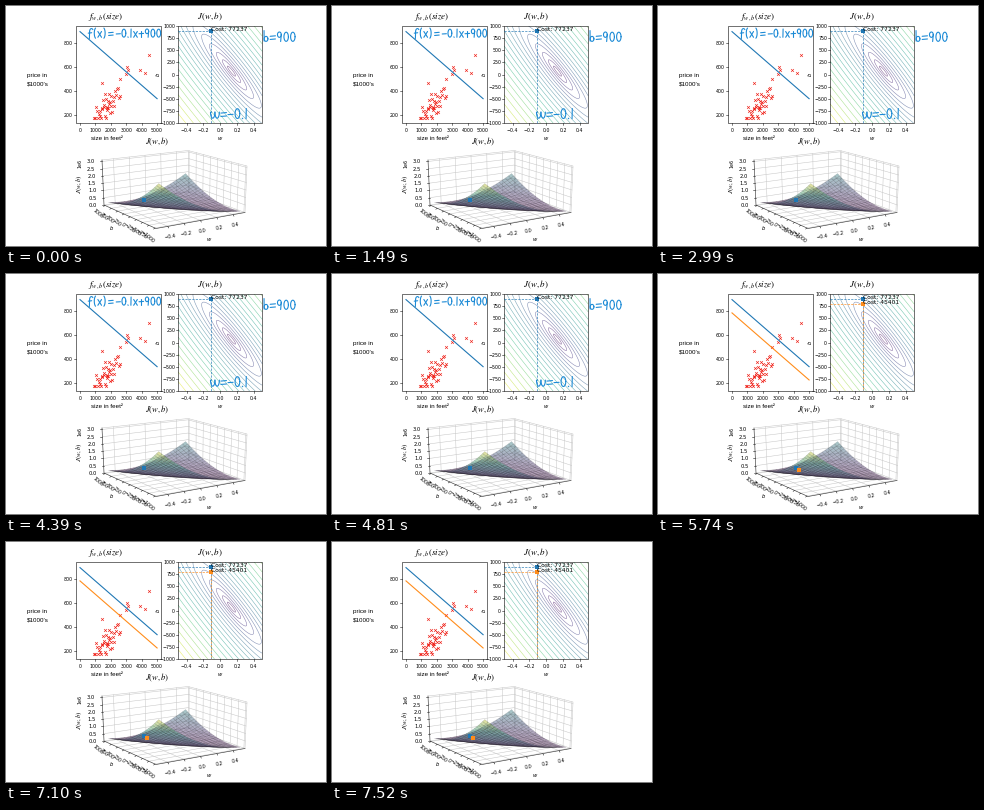
A matplotlib script that plays this animation: 320 px wide and 240 px high, repeating every 8 s.

```python
import numpy as np
import matplotlib.pyplot as plt
from matplotlib.animation import FuncAnimation
from matplotlib.collections import PolyCollection
from matplotlib.patches import Rectangle

plt.rcParams["mathtext.fontset"] = "stix"
plt.rcParams["font.family"] = "DejaVu Sans"

W, H, DPI = 320, 240, 80
STEP, LOOP, SWITCH = 40, 8000, 5720
PT = 72 / DPI
BLUE, ORANGE, INK = "#1f77b4", "#ff8c1a", "#1b8ad6"

fig = plt.figure(figsize=(W / DPI, H / DPI), dpi=DPI, facecolor="white")
ax = fig.add_axes([0, 0, 1, 1])
ax.set_xlim(0, W)
ax.set_ylim(H, 0)
ax.axis("off")


def text(x, y, s, size, ha="center", **kw):
    return ax.text(x, y, s, fontsize=size * PT, ha=ha,
                   va=kw.pop("va", "center_baseline"), **kw)


def line(points, color="black", width=0.5, **kw):
    x, y = np.transpose(points)
    return ax.plot(x, y, color=color, lw=width * PT, **kw)[0]


def dot(x, y, color, size=4.2, **kw):
    return ax.plot([x], [y], "s", color=color, ms=size * PT, mew=0, **kw)[0]


def number(v, digits=0):
    return f"{v:.{digits}f}".replace("-", "\u2212")


def cost(w, b):
    """Squared error cost around the best fit for sizes of 2000 +- 795."""
    dw, db = w - 0.1345, b - 71
    return ((db + 2000 * dw) ** 2 + (795 * dw) ** 2) / 2 + 2050


# ---- flat plots ----
def left(x, y):
    return 74 + x * 0.01542, 108.7 - (y - 200) * 0.1187


def right(w, b):
    return 214.2 + w * 84, 68.6 - b * 0.0484


def frame_box(x0, y0, x1, y1):
    ax.add_patch(Rectangle((x0, y0), x1 - x0, y1 - y0, fill=False,
                           ec="black", lw=0.55 * PT, zorder=4))


def tick_x(x, label):
    line([(x, 117), (x, 119)])
    text(x, 124, label, 4.8)


def tick_y(x, y, label):
    line([(x - 2, y), (x, y)])
    text(x - 3, y, label, 4.8, "right")


frame_box(70, 20, 154.7, 117)
for v in range(0, 5001, 1000):
    tick_x(left(v, 0)[0], number(v))
for v in range(200, 801, 200):
    tick_y(70, left(0, v)[1], number(v))

# a dense cloud of small houses and a few large ones
rng = np.random.default_rng(4)
t = np.linspace(-1, 1, 39)
size = 1750 + 550 * t + 300 * t ** 3
price = np.maximum(45 + 0.135 * size + rng.normal(0, 50, t.size), 170)
large = [(4478, 700), (4215, 549), (3890, 574), (3137, 580), (3031, 599),
         (3000, 540), (2609, 500), (1458, 464)]
houses = np.vstack([np.column_stack([size, price]), large])
ax.plot(*left(*houses.T), "x", color="#f0241c", ms=2.8 * PT, mew=0.65 * PT)

frame_box(172.2, 20, 256.2, 117)
for v in np.linspace(-0.4, 0.4, 5):
    tick_x(right(v, 0)[0], number(v, 1))
for v in range(-1000, 1001, 250):
    tick_y(172.2, right(0, v)[1], number(v))
text(214, 131.5, "w", 5.2, style="italic")
text(152, 69, "b", 5.2, style="italic", rotation=90)

ww, bb = np.meshgrid(np.linspace(-0.5, 0.5, 120), np.linspace(-1000, 1000, 120))
k = np.arange(1, 21)
ax.contour(*right(ww, bb), cost(ww, bb), levels=2050 + (25 * k + 3 * k ** 2) ** 2,
           colors=plt.cm.viridis(k / 20), linewidths=0.55 * PT, alpha=0.62)

# ---- titles ----
text(100, 9.5, "$f_{w,b}(size)$", 9)
text(203.5, 9.5, "$J(w,b)$", 9)
text(151.5, 134.5, "$J(w,b)$", 8.5)
LABEL = dict(ha="left", family="Liberation Sans")
text(21, 69, "price in", 6.2, **LABEL)
text(21, 77.5, r"\$1000's", 6.2, **LABEL)
text(85, 132.5, "size in feet\u00b2", 6.2, **LABEL)

# ---- surface plot ----
# corners indexed [u][v], u along w and v along b
FLOOR = np.array([[(150, 222.5), (98, 199)], [(239, 206.5), (182, 185.5)]])
TOP = np.array([[(150, 175), (96, 154)], [(241, 160), (182, 144.5)]])
ZMAX = 3.1
EW, EB = 0.545, 1040


def project(w, b, z=0.0):
    """Stage position of a point in the box, blended from its corners."""
    u, v, s = (np.asarray(c, float)[..., None] for c in
               (0.5 + w / (2 * EW), 0.5 + b / (2 * EB), z / ZMAX))

    def mix(c):
        return ((1 - u) * ((1 - v) * c[0][0] + v * c[0][1])
                + u * ((1 - v) * c[1][0] + v * c[1][1]))
    return (1 - s) * mix(FLOOR) + s * mix(TOP)


GRID = dict(color="#c6c6c6", width=0.5)
for w in np.linspace(-0.4, 0.4, 5):
    line([project(w, -EB), project(w, EB), project(w, EB, ZMAX)], **GRID)
    x, y = project(w, -EB)
    line([(x, y), (x + 0.8, y + 1.6)])
    text(x + 2, y + 9, number(w, 1), 4.9, rotation=8)
for b in range(-1000, 1001, 250):
    line([project(-EW, b), project(EW, b), project(EW, b, ZMAX)], **GRID)
    x, y = project(-EW, b)
    line([(x, y), (x - 1.4, y + 1)])
    text(x - 7, y + 8.5, number(b), 4.8, rotation=-40, va="center")
for z in np.arange(0, 3.1, 0.5):
    line([project(-EW, EB, z), project(EW, EB, z), project(EW, -EB, z)], **GRID)
    x, y = project(-EW, EB, z)
    line([(x, y), (x - 2, y)])
    text(x - 7, y, number(z, 1), 5.2, "right")
line([TOP[0][1], TOP[1][1], TOP[1][0], FLOOR[1][0]], **GRID)
line([FLOOR[1][1], TOP[1][1]], **GRID)
line([TOP[0][1], FLOOR[0][1], FLOOR[0][0], FLOOR[1][0]], "#333333", 0.6)
text(73.5, 178, "$J(w,b)$", 6.8, rotation=90, va="center")
text(73.5, 157, "1e6", 4.8, rotation=90, va="center")
text(106, 221.5, "b", 5.2, style="italic")
text(203, 233, "w", 5.2, style="italic")

N = 26
gw, gb = np.meshgrid(np.linspace(-0.5, 0.5, N), np.linspace(-1000, 1000, N))
gz = cost(gw, gb) / 1e6
mesh = project(gw, gb, gz)
cells = sorted(np.ndindex(N - 1, N - 1), key=lambda c: -sum(c))
quads = [mesh[[i, i, i + 1, i + 1], [j, j + 1, j + 1, j]] for i, j in cells]
tone = plt.cm.viridis([gz[i:i + 2, j:j + 2].mean() / gz.max()
                       for i, j in cells])
tone[:, :3] = 0.62 * tone[:, :3] + 0.38 * 0.5
tone[:, 3] = 0.48
ax.add_collection(PolyCollection(quads, facecolors=tone, lw=0.35 * PT,
                                 edgecolors=(0, 0, 0, 0.2), zorder=3))


# ---- chosen parameters ----
def choice(w, b, label, color, spot, z):
    """Line, contour marker, guides and surface marker of one (w, b)."""
    x, y = right(w, b)
    guide = dict(width=0.75, ls=(0, (3, 1.6)), alpha=0.85, zorder=z)
    return [
        line([left(0, b), left(5000, b + 5000 * w)], color, 1.1, zorder=z),
        line([(172.2, y), (x, y)], color, **guide),
        line([(x, y), (x, 117)], color, **guide),
        dot(x, y, color, zorder=z + 1),
        text(x + 0.3, y - 2, label, 6, "left", zorder=9),
        dot(*spot, color, 3.8, zorder=z + 1),
    ]


choice(-0.113, 900, "Cost: 77237", BLUE, (138, 193.5), 5)
second = choice(-0.113, 788, "Cost: 45401", ORANGE, (140.5, 195.5), 6)


# ---- handwriting: each letter is a width and strokes in a unit cell ----
def arc(cx, cy, rx, ry, start=0, stop=360):
    a = np.radians(np.linspace(start, stop, 24))
    return np.column_stack([cx + rx * np.cos(a), cy + ry * np.sin(a)])


def seg(x0, y0, x1, y1):
    return np.array([(x0, y0), (x1, y1)])


GLYPHS = {
    "f": (4.6, [arc(.75, .3, .4, .35, 180, 320), seg(.35, .3, .3, 1.15),
                seg(.05, .5, .8, .45)]),
    "(": (2.4, [arc(1, .5, .8, .65, 110, 250)]),
    ")": (2.4, [arc(0, .5, .8, .65, -70, 70)]),
    "x": (4.6, [seg(.1, .3, .9, 1), seg(.9, .3, .1, 1)]),
    "=": (4.6, [seg(0, .45, 1, .4), seg(0, .78, 1, .73)]),
    "-": (4.2, [seg(0, .6, 1, .57)]),
    "+": (4.6, [seg(0, .57, 1, .53), seg(.5, .2, .5, .95)]),
    ".": (1.4, [seg(.3, .95, .6, 1)]),
    "1": (2.0, [seg(.55, 0, .45, 1)]),
    "0": (4.6, [arc(.5, .5, .42, .48)]),
    "9": (4.6, [arc(.48, .28, .36, .28), seg(.84, .25, .72, 1)]),
    "b": (4.6, [seg(.1, -.15, .12, .95), arc(.48, .72, .36, .26)]),
    "w": (7.2, [arc(.25, .35, .25, .6, 0, 180), arc(.75, .35, .25, .6, 0, 180)]),
    " ": (0.6, []),
}


def write(s, x, y, scale=1.0):
    out = []
    for ch in s:
        width, strokes = GLYPHS[ch]
        out += [line(p * (width * scale, 8.3 * scale) + (x, y), INK, 1.1,
                     zorder=8, solid_capstyle="round") for p in strokes]
        x += (width + 1.2) * scale
    return out


notes = (write("f(x) = -0.1x+900", 82, 23)
         + write("b=900", 257.5, 26, 1.15)
         + write("w=-0.1", 204.5, 102.5, 1.23))


def update(i):
    later = i * STEP >= SWITCH
    for a in second:
        a.set_visible(later)
    for a in notes:
        a.set_visible(not later)
    return second + notes


anim = FuncAnimation(fig, update, frames=LOOP // STEP, interval=STEP,
                     init_func=lambda: update(0), repeat=True, repeat_delay=0)
plt.show()
```
